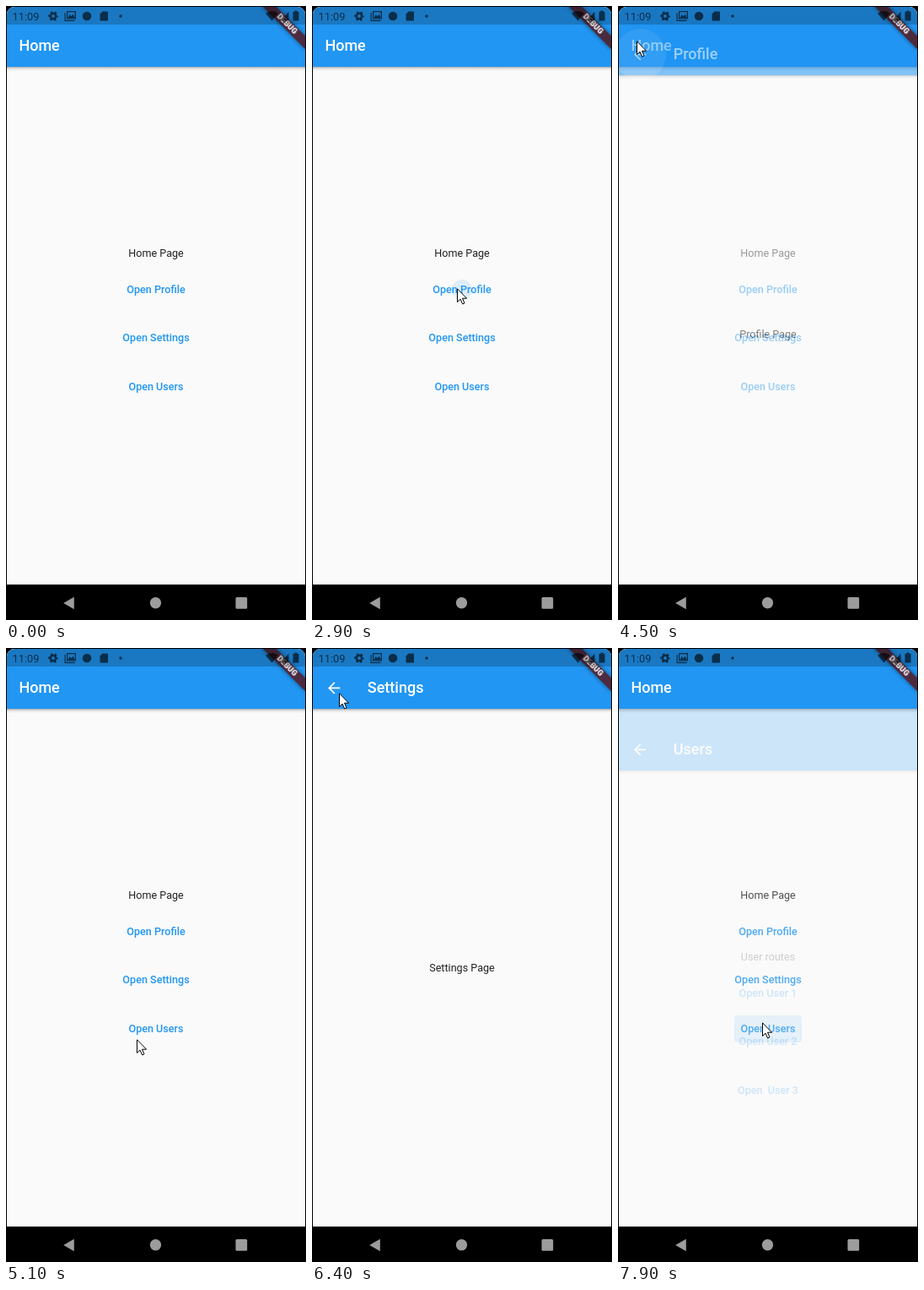
Write an HTML page that moves like this. It is 356x727 px and loops after 8000 ms.

```html
<!DOCTYPE html>
<html lang="en">
<head>
<meta charset="utf-8">
<title>Page navigation</title>
<style>
  :root { --blue: #2196f3; --loop: 8s step-end -8ms infinite both; }
  html, body { margin: 0; width: 100%; height: 100%; overflow: hidden; background: #000; }
  body { position: relative; font: 12.6px Roboto, sans-serif; color: #212121; }
  svg { position: absolute; left: 0; top: 0; }

  .screen {
    position: absolute; left: 1px; top: 0; width: 354px; height: 685px;
    overflow: hidden; clip-path: inset(1px 0 0 round 9px 9px 0 0); background: #fafafa;
  }
  .page { position: absolute; inset: 0; background: #fafafa; }
  .bar { position: absolute; left: 0; top: 0; width: 100%; height: 72.4px; background: var(--blue); }
  .bar::after {
    content: ""; position: absolute; left: 0; top: 100%; width: 100%; height: 5px;
    background: linear-gradient(rgba(0,0,0,.3), rgba(0,0,0,.08) 50%, transparent);
  }
  .title {
    position: absolute; left: 64.8px; top: 22.4px;
    font-size: 18px; font-weight: 500; line-height: 50.4px; color: #fff;
  }
  .home .title { left: 14.4px; }
  .row {
    position: absolute; left: 0; width: 100%; top: var(--y); height: 32.4px;
    display: flex; justify-content: center; line-height: 32.4px; white-space: pre;
  }
  .button {
    position: relative; overflow: hidden; padding: 0 7.2px; border-radius: 3.6px;
    font-weight: 500; color: var(--blue);
  }
  .splash::before {
    content: ""; position: absolute; left: 50%; top: 50%; width: 24px; height: 24px;
    margin: -12px; border-radius: 50%; background: rgba(33,150,243,.12);
    transform: scale(0); animation: var(--press) var(--loop);
  }
  .text { --y: 276.8px }
  .b1 { --y: 319.8px } .b2 { --y: 377.4px } .b3 { --y: 435px }
  .middle { --y: 363px }

  .halo {
    position: absolute; left: -5px; top: 16.5px; width: 61px; height: 61px;
    border-radius: 50%; background: rgba(255,255,255,.14); animation: halo var(--loop);
  }
  .profile { animation: profile var(--loop); }
  .settings { animation: settings var(--loop); }
  .users { animation: users var(--loop); }

  .ribbon {
    position: absolute; left: 318px; top: 25.2px; width: 72px; height: 10.8px;
    transform: rotate(45deg); transform-origin: 36px -25.2px;
    background: rgba(183,28,28,.63); box-shadow: 0 0 5px rgba(0,0,0,.5);
    color: #fff; font-size: 9.2px; font-weight: 900; line-height: 10.8px; text-align: center;
  }
  .ribbon::before { content: ""; position: absolute; inset: 0; z-index: -1; background: rgba(0,0,0,.4); }
  .status { position: absolute; left: 0; top: 0; width: 100%; height: 21.6px; background: rgba(0,0,0,.2); }
  .cursor { width: 14px; height: 21px; animation: cursor 8s linear -8ms infinite; }

  /* Pages rise and fade in, then leave the same way */
  @keyframes profile {
    0% { opacity: 0; transform: none }
    38.75% { opacity: .17; transform: translateY(84px) }
    40% { opacity: .56; transform: translateY(10px) }
    41.25% { opacity: 1; transform: none }
    56.25% { opacity: .56; transform: translateY(10px) }
    58.75%, 100% { opacity: 0; transform: none }
  }
  @keyframes settings {
    0% { opacity: 0; transform: none }
    71.25% { opacity: .21; transform: translateY(73px) }
    73.75% { opacity: 1; transform: none }
    85% { opacity: .56; transform: translateY(10px) }
    87.5%, 100% { opacity: 0; transform: none }
  }
  @keyframes users {
    0% { opacity: 0; transform: none }
    98.75%, 100% { opacity: .21; transform: translateY(73px) }
  }
  @keyframes press1 {
    0% { transform: scale(0) }
    36.25% { transform: scale(1) }
    38.75% { transform: scale(5) }
    42.5%, 100% { transform: scale(0) }
  }
  @keyframes press2 {
    0% { transform: scale(0) }
    70% { transform: scale(1) }
    71.25% { transform: scale(5) }
    75%, 100% { transform: scale(0) }
  }
  @keyframes press3 {
    0% { transform: scale(0) }
    97.5% { transform: scale(1) }
    98.75%, 100% { transform: scale(5) }
  }
  @keyframes halo {
    0% { opacity: 0 }
    56.25% { opacity: 1 }
    58.75%, 100% { opacity: 0 }
  }
  /* The pointer jumps every 100 ms while it moves */
  @keyframes cursor {
    0% { transform: translate(22px, -18px) }
    1.25% { transform: translate(22px, -18px); animation-timing-function: steps(6) }
    8.75% { transform: translate(179px, 313px) }
    12.5% { transform: translate(179px, 313px); animation-timing-function: steps(2) }
    15% { transform: translate(186px, 356px) }
    17.5% { transform: translate(186px, 356px); animation-timing-function: steps(1) }
    18.75% { transform: translate(185px, 355px) }
    20% { transform: translate(185px, 355px); animation-timing-function: steps(4) }
    25% { transform: translate(181px, 342px) }
    27.5% { transform: translate(181px, 342px); animation-timing-function: steps(4) }
    32.5% { transform: translate(172px, 334px) }
    46.25% { transform: translate(172px, 334px); animation-timing-function: steps(5) }
    52.5% { transform: translate(22px, 41px) }
    57.5% { transform: translate(22px, 41px); animation-timing-function: steps(5) }
    63.75% { transform: translate(155px, 463px); animation-timing-function: steps(3) }
    67.5% { transform: translate(167px, 388px) }
    72.5% { transform: translate(167px, 388px); animation-timing-function: steps(6) }
    80% { transform: translate(32px, 53px); animation-timing-function: steps(2) }
    82.5% { transform: translate(25px, 47px) }
    86.25% { transform: translate(25px, 47px); animation-timing-function: steps(4) }
    91.25% { transform: translate(160px, 488px); animation-timing-function: steps(3) }
    95%, 100% { transform: translate(171px, 443px) }
  }
</style>
</head>
<body>
<svg width="0" height="0">
  <symbol id="back" viewBox="0 0 24 24">
    <path fill="#fff" d="M20 11H7.83l5.59-5.59L12 4l-8 8 8 8 1.41-1.41L7.83 13H20z"/>
  </symbol>
</svg>

<div class="screen">
  <div class="page home">
    <div class="bar"><div class="title">Home</div></div>
    <div class="row text">Home Page</div>
    <div class="row b1"><span class="button splash" style="--press: press1">Open Profile</span></div>
    <div class="row b2"><span class="button splash" style="--press: press2">Open Settings</span></div>
    <div class="row b3"><span class="button splash" style="--press: press3">Open Users</span></div>
  </div>

  <div class="page profile">
    <div class="bar">
      <svg width="354" height="73"><use href="#back" x="14.4" y="36.6" width="21.6" height="21.6"/></svg>
      <div class="title">Profile</div>
    </div>
    <div class="halo"></div>
    <div class="row middle">Profile Page</div>
  </div>

  <div class="page settings">
    <div class="bar">
      <svg width="354" height="73"><use href="#back" x="14.4" y="36.6" width="21.6" height="21.6"/></svg>
      <div class="title">Settings</div>
    </div>
    <div class="row middle">Settings Page</div>
  </div>

  <div class="page users">
    <div class="bar">
      <svg width="354" height="73"><use href="#back" x="14.4" y="36.6" width="21.6" height="21.6"/></svg>
      <div class="title">Users</div>
    </div>
    <div class="row text">User routes</div>
    <div class="row b1"><span class="button">Open User 1</span></div>
    <div class="row b2"><span class="button">Open User 2</span></div>
    <div class="row b3"><span class="button">Open  User 3</span></div>
  </div>

  <div class="ribbon">DEBUG</div>
  <div class="status"></div>
</div>

<svg width="356" height="727">
  <g fill="#000" fill-opacity=".62">
    <text x="7.6" y="16.5" font-size="12.8">11:09</text>
    <!-- gear -->
    <g fill="none" stroke="#000" stroke-opacity=".62">
      <circle cx="56" cy="12" r="3.2" stroke-width="2.6"/>
      <circle cx="56" cy="12" r="5" stroke-width="1.6" stroke-dasharray="2.6 2.636" stroke-dashoffset="1.3"/>
    </g>
    <!-- gallery -->
    <path fill-rule="evenodd" d="M72 6h11v9.500h-11zM73.300 7.300v6.900h8.400v-6.900z"/>
    <path d="M73.500 14l2.300-4 2 2.300 1.800-2.800 2.200 4.500zM69.500 8h1.200v8.800h10.800v1.200h-12z"/>
    <circle cx="96" cy="12" r="5.300"/>
    <!-- memory card -->
    <path d="M114.500 6.500h5.500q1 0 1 1v9q0 1-1 1h-7.500q-1 0-1-1v-7z"/>
    <circle cx="136" cy="12" r="1.700"/>
    <!-- wifi, signal, battery -->
    <path d="M308 8.800q7.500-6 15 0l-7.500 8.700z"/>
    <path d="M335.500 6.500v11h-9.500z"/>
    <path d="M342.500 6.800v-1.300h3v1.300h2v10.700h-7v-10.700z"/>
  </g>
  <g fill="#9c9c9c">
    <path d="M80.800 699.800v14.400l-12.600-7.200z"/>
    <circle cx="177.500" cy="706.800" r="6.700"/>
    <rect x="272.500" y="700" width="13.700" height="13.700" rx="1.500"/>
  </g>
</svg>

<svg class="cursor" viewBox="0 0 14 21">
  <path fill="#fff" stroke="#000" d="M.5 .8V16.500L4.100 13.100 6.600 18.900 9 17.900 6.500 12.200H11.600z"/>
</svg>
</body>
</html>
```
